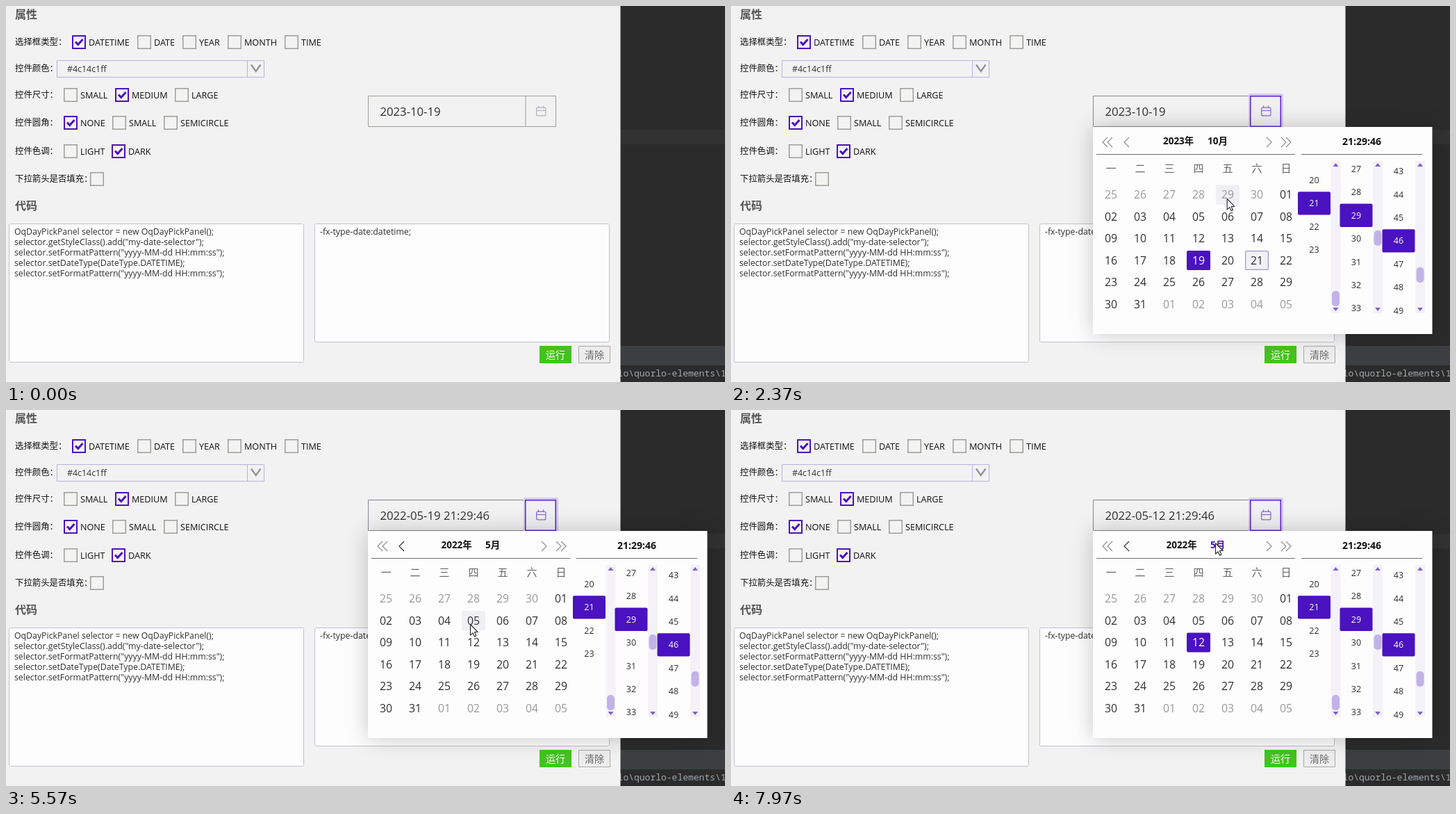
An HTML page with a canvas for the animation above (8000 ms loop, 1035 px wide and 541 px high).

```html
<!DOCTYPE html>
<html lang="zh-CN">
<head>
<meta charset="utf-8">
<style>
html, body { margin: 0; width: 100%; height: 100%; overflow: hidden; background: #f2f2f2; }
canvas { display: block; }
</style>
</head>
<body>
<canvas id="stage" width="1035" height="541"></canvas>
<script>
const g = document.getElementById('stage').getContext('2d');
const LOOP = 8000;
const SANS = '"Open Sans", "Noto Sans CJK SC", "Noto Sans CJK JP", sans-serif';
const MONO = '"Noto Sans Mono", monospace';
const PURPLE = '#4a12c0', INK = '#303030', GREY = '#9d9d98', PALE = '#8f8f92';

const FOCUS = 1700, OPEN = 2140, YEARS = 3600, MONTHS = 4430, DAYS = 5570, PICK = 6430;

// Pointer path: time, x, y
const path = [
  [30, 1024, 517], [530, 4, 2], [830, 315, 76], [930, 441, 91], [1250, 735, 138],
  [1450, 768, 160], [1670, 763, 155], [2170, 763, 155], [2500, 682, 355], [2600, 682, 355],
  [2850, 628, 285], [3170, 661, 211], [3400, 648, 197], [3650, 648, 197], [4230, 586, 308],
  [4450, 588, 309], [4570, 608, 314], [5000, 640, 305], [5230, 640, 305], [5370, 668, 308],
  [5650, 668, 308], [6270, 673, 328], [6500, 673, 328], [7030, 709, 335], [7170, 709, 335],
  [7500, 814, 412], [7970, 697, 191], [8000, 697, 191]
];

function pointer(t) {
  const i = path.findIndex(p => p[0] > t);
  if (i < 1) return null;
  const [t0, x0, y0] = path[i - 1], [t1, x1, y1] = path[i];
  const k = (t - t0) / (t1 - t0);
  return { x: x0 + (x1 - x0) * k, y: y0 + (y1 - y0) * k };
}

const inside = (p, x, y, w, h) => p && p.x >= x && p.x < x + w && p.y >= y && p.y < y + h;

// Text placed by the middle of its capitals
function text(s, x, cy, size, color = INK, align = 'left', weight = 400, font = SANS) {
  g.font = `${weight} ${size}px ${font}`;
  g.fillStyle = color;
  g.textAlign = align;
  g.fillText(s, x, cy + size * 0.36);
}

function fill(x, y, w, h, color, r = 0) {
  g.fillStyle = color;
  g.beginPath();
  g.roundRect(x, y, w, h, r);
  g.fill();
}

function frame(x, y, w, h, color, width = 1, r = 0) {
  g.strokeStyle = color;
  g.lineWidth = width;
  g.beginPath();
  g.roundRect(x + width / 2, y + width / 2, w - width, h - width, r);
  g.stroke();
}

function line(points, color, width = 1) {
  g.strokeStyle = color;
  g.lineWidth = width;
  g.beginPath();
  points.forEach(([x, y]) => g.lineTo(x, y));
  g.stroke();
}

function shape(points, color) {
  g.fillStyle = color;
  g.beginPath();
  points.forEach(([x, y]) => g.lineTo(x, y));
  g.closePath();
  g.fill();
}

function checkbox(x, cy, label, on, glow) {
  const y = cy - 10;
  if (glow) fill(x - 3, y - 3, 26, 26, '#d3c8ec', 2);
  fill(x, y, 20, 20, '#f3f3f3');
  frame(x, y, 20, 20, on ? PURPLE : GREY, on ? 2 : 1.5);
  if (on) line([[x + 5, cy - 0.5], [x + 8.7, cy + 3.5], [x + 15.5, cy - 4]], PURPLE, 3);
  text(label, x + 24, cy, 12.6, '#111');
}

const options = [
  [52, '选择框类型：', [95, 'DATETIME', 1], [189, 'DATE'], [254, 'YEAR'], [319, 'MONTH'], [401, 'TIME']],
  [90, '控件颜色：'],
  [128, '控件尺寸：', [83, 'SMALL'], [157, 'MEDIUM', 1], [243, 'LARGE']],
  [168, '控件圆角：', [83, 'NONE', 1], [153, 'SMALL'], [227, 'SEMICIRCLE']],
  [209, '控件色调：', [83, 'LIGHT'], [152, 'DARK', 1]],
  [249, '下拉箭头是否填充：', [121, '']]
];

const code = [
  'OqDayPickPanel selector = new OqDayPickPanel();',
  'selector.getStyleClass().add("my-date-selector");',
  'selector.setFormatPattern("yyyy-MM-dd HH:mm:ss");',
  'selector.setDateType(DateType.DATETIME);',
  'selector.setFormatPattern("yyyy-MM-dd HH:mm:ss");'
];

function backdrop() {
  fill(0, 0, 1035, 541, '#2b2b2b');
  fill(884, 178, 151, 21, '#323232');
  fill(884, 489, 151, 28, '#3b3f41');
  text('lo\\quorlo-elements\\1', 880.6, 528, 13, '#a4a9ad', 'left', 400, MONO);
  fill(0, 0, 884.5, 541, '#f2f2f2');
}

function settings(t) {
  text('属性', 13, 12, 16, '#555', 'left', 700);
  text('代码', 13, 287, 16, '#555', 'left', 700);
  for (const [cy, label, ...boxes] of options) {
    text(label, 13, cy, 12.4, '#111');
    for (const [x, name, on] of boxes)
      checkbox(x, cy, name, on, name === 'DATETIME' && t >= FOCUS && t < OPEN);
  }
  frame(73, 78, 299, 25, '#b8b2dc');
  line([[347.5, 78], [347.5, 103]], '#b8b2dc');
  text('#4c14c1ff', 88, 90.5, 12.4);
  line([[353, 84.5], [359.7, 94], [366.5, 84.5]], '#939399', 2.4);

  for (const [x, h] of [[4, 200], [444, 171]]) {
    fill(x, 313, 425, h, '#fdfdfd', 2);
    frame(x, 313, 425, h, '#c3c1cf', 1, 2);
  }
  code.forEach((s, i) => text(s, 12, 324.5 + i * 14.9, 12.3));
  text('-fx-type-date:datetime;', 452, 324.5, 12.3);

  fill(768, 489, 46, 25, '#43c31d');
  text('运行', 791, 502, 14, '#fff', 'center');
  fill(824, 489, 46, 25, '#ededed');
  frame(824, 489, 46, 25, '#a8a8a8');
  text('清除', 847, 502, 14, '#666', 'center');
}

function dateField(t, p) {
  const open = t >= OPEN;
  const hover = inside(p, 748, 129, 44, 44);
  const value = t < DAYS ? '2023-10-19' : `2022-05-${t < PICK ? 19 : 12} 21:29:46`;
  frame(521, 129, 271, 45, open ? '#85858f' : GREY);
  text(value, 538.5, 152, 16.7);
  if (open) {
    fill(745, 126, 50, 50, '#d4caea', 2);
    fill(748, 129, 44, 45, '#f0eff3');
  }
  if (open || hover) frame(747, 129, 45, 45, open ? '#5a26bf' : '#7f62b0', open ? 1.5 : 1);
  else line([[748, 129], [748, 174]], GREY);

  const tint = open ? '#8568c9' : hover ? '#9c82dc' : '#b5b1bd';
  frame(763, 145.5, 14.5, 13, tint, 1.2, 2);
  line([[763, 150.5], [777, 150.5]], tint, 1.2);
  for (const x of [766.5, 773.5]) line([[x, 143.5], [x, 147]], tint, 1.2);
}

function chevron(x, dir, color = PALE) {
  line([[x + dir * 3.5, 189], [x - dir * 3.5, 196], [x + dir * 3.5, 203]], color, 1.2);
}

function heading(s, x, p) {
  g.font = `700 13.5px ${SANS}`;
  const w = g.measureText(s).width;
  text(s, x, 194.5, 13.5, inside(p, x - 3, 182, w + 6, 31) ? PURPLE : '#111', 'left', 700);
}

function dayView(t, p) {
  const later = t >= DAYS;
  const chosen = !later ? 19 : t >= PICK ? 12 : 0;
  for (const x of [538.5, 545.5]) chevron(x, 1);
  chevron(569.5, 1, later ? '#333' : PALE);
  chevron(774.5, -1);
  for (const x of [795.5, 802.5]) chevron(x, -1);
  heading(later ? '2022年' : '2023年', later ? 626.5 : 622, p);
  heading(later ? '5月' : '10月', later ? 690 : 686, p);
  [...'一二三四五六日'].forEach((s, i) => text(s, 547 + i * 42, 234, 15, '#666', 'center'));

  for (let i = 0; i < 42; i++) {
    const n = i - 5, current = n > 0 && n < 32;
    const day = n < 1 ? n + 30 : n > 31 ? n - 31 : n;
    const x = 547 + i % 7 * 42, cy = 271.5 + Math.floor(i / 7) * 31.5;
    const box = [x - 17, cy - 14, 34, 28];
    const selected = current && day === chosen;
    if (selected) fill(...box, PURPLE, 2);
    else if (inside(p, ...box)) fill(...box, '#f0eff3', 2);
    if (current && !later && day === 21) {
      fill(...box, '#f2f0f7', 2);
      frame(...box, '#a199ba', 1.2, 2);
    }
    text(String(day).padStart(2, '0'), x, cy, 15.8, selected ? '#fff' : current ? INK : '#999', 'center');
  }
}

function gridView(title, label, p) {
  chevron(541.5, 1);
  chevron(802.5, -1);
  text(title, 669, 194.5, 13.5, '#111', 'center', 700);
  for (let i = 0; i < 12; i++) {
    const x = 573.5 + i % 3 * 95.3, cy = 255 + Math.floor(i / 3) * 51.8;
    const box = [x - 42, cy - 20, 84, 40];
    if (inside(p, ...box)) fill(...box, '#f0eff2', 2);
    text(label(i), x, cy, 12.5, INK, 'center');
  }
}

// Columns: centre x, first number, first row y, count, chosen index, thumb y
const columns = [
  [839.5, 20, 250.5, 4, 1, 410],
  [900, 27, 234.5, 7, 2, 323],
  [961, 43, 237.7, 7, 3, 376]
];

function clock() {
  text('21:29:46', 908, 194.5, 14, '#111', 'center', 700);
  for (const [x, first, top, count, chosen, thumb] of columns) {
    const bar = x + 31;
    for (let i = 0; i < count; i++) {
      const cy = top + i * 33.4;
      if (i === chosen) fill(x - 23.5, cy - 16.7, 47, 33.4, PURPLE, 2);
      text(first + i, x, cy, 12.5, i === chosen ? '#fff' : INK, 'center');
    }
    fill(bar - 7, 223, 14, 219, '#f4f2f8');
    shape([[bar - 4, 231], [bar, 226], [bar + 4, 231]], '#7d62c9');
    shape([[bar - 4, 434], [bar, 439], [bar + 4, 434]], '#7d62c9');
    fill(bar - 5.5, thumb, 11, 22, '#c2b2e7', 5);
  }
}

function popup(t, p) {
  g.save();
  g.shadowColor = 'rgba(0,0,0,.22)';
  g.shadowBlur = 30;
  fill(521, 174, 488.5, 298, '#fdfdfd');
  g.restore();
  line([[526, 213.5], [812, 213.5]], '#707073');
  line([[821, 213.5], [995, 213.5]], '#707073');
  if (t < YEARS || t >= DAYS) dayView(t, p);
  else if (t < MONTHS) gridView('2019年 - 2030年', i => 2019 + i, p);
  else gridView('2022年', i => i + 1 + '月', p);
  clock();
}

function arrow({ x, y }) {
  g.save();
  g.translate(x, y);
  const outline = [[0.5, 0.5], [0.5, 16], [4, 12.8], [6.4, 18], [8.8, 17], [6.5, 11.8], [11, 11.4], [0.5, 0.5]];
  shape(outline, '#fff');
  line(outline, '#222', 1.1);
  g.restore();
}

function draw(now) {
  const t = now % LOOP, p = pointer(t);
  backdrop();
  settings(t);
  dateField(t, p);
  if (t >= OPEN) popup(t, p);
  if (p) arrow(p);
  requestAnimationFrame(draw);
}
requestAnimationFrame(draw);
</script>
</body>
</html>
```
